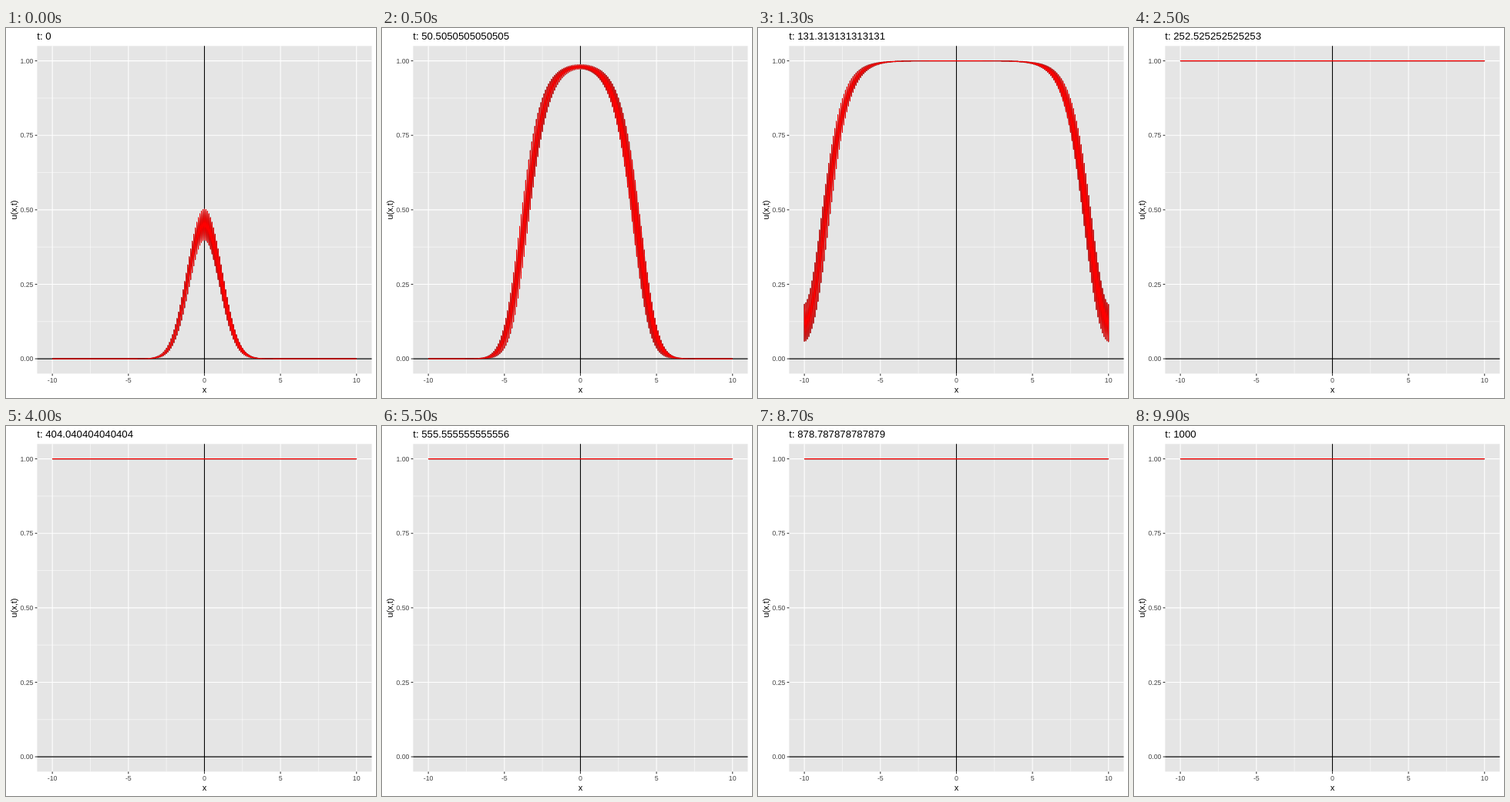
These frames come from a looping animation (480 by 480 pixels, 10 s). An HTML page:

```html
<!DOCTYPE html>
<html lang="en">
<head>
<meta charset="utf-8">
<title>Travelling front</title>
<style>
  html, body { margin: 0; width: 100%; height: 100%; overflow: hidden; background: #fff; }
  svg { display: block; width: 100vw; height: 100vh; font-family: "Liberation Sans", Arial, sans-serif; }
  .tick { font-size: 8.8px; fill: #444; }
  .label { font-size: 11px; text-anchor: middle; }
  .curve { fill: none; stroke-width: 1.07; stroke-linejoin: round; }
</style>
</head>
<body>
<svg id="stage" viewBox="0 0 480 480">
  <rect width="480" height="480" fill="#fff"/>
  <rect x="40.4" y="23.3" width="434.1" height="425.1" fill="#e5e5e5"/>
  <g id="grid"></g>
  <g id="axes"></g>
  <path class="curve" stroke="#000"/>
  <path class="curve" stroke="#f00"/>
  <text class="label" x="257.4" y="473">x</text>
  <text class="label" transform="translate(13.6 236) rotate(-90)">u(x,t)</text>
  <text id="title" x="40.3" y="15" font-size="13.2"></text>
</svg>
<script>
const FRAMES = 100, FRAME_MS = 100, T_END = 1000;
const PANEL = { left: 40.4, right: 474.5, top: 23.3, bottom: 448.4 };
const px = x => 257.45 + x * 19.73;
const py = u => 429.1 - u * 386.5;

const grid = document.getElementById('grid');
const axes = document.getElementById('axes');
const title = document.getElementById('title');
const curves = document.querySelectorAll('.curve');

function add(parent, tag, attrs, text = '') {
  const el = document.createElementNS('http://www.w3.org/2000/svg', tag);
  for (const key in attrs) el.setAttribute(key, attrs[key]);
  el.textContent = text;
  parent.append(el);
}
const line = (parent, x1, y1, x2, y2, stroke, width = 1.07) =>
  add(parent, 'line', { x1, y1, x2, y2, stroke, 'stroke-width': width });
const vertical = (parent, x, color, width) => line(parent, px(x), PANEL.top, px(x), PANEL.bottom, color, width);
const horizontal = (parent, u, color, width) => line(parent, PANEL.left, py(u), PANEL.right, py(u), color, width);

function drawAxes() {
  for (let x = -7.5; x < 10; x += 5) vertical(grid, x, '#fff', 0.53);
  for (let u = 0.125; u < 1; u += 0.25) horizontal(grid, u, '#fff', 0.53);
  for (let x = -10; x <= 10; x += 5) {
    vertical(grid, x, '#fff');
    line(axes, px(x), PANEL.bottom, px(x), PANEL.bottom + 2.75, '#333');
    add(axes, 'text', { class: 'tick', x: px(x), y: 459.8, 'text-anchor': 'middle' }, x);
  }
  for (let u = 0; u <= 1; u += 0.25) {
    horizontal(grid, u, '#fff');
    line(axes, PANEL.left - 2.75, py(u), PANEL.left, py(u), '#333');
    add(axes, 'text', { class: 'tick', x: 35.5, y: py(u) + 3.2, 'text-anchor': 'end' }, u.toFixed(2));
  }
  horizontal(axes, 0, '#000');
  vertical(axes, 0, '#000');
}

// Logistic growth with diffusion, no flux at the ends; one state per unit of time.
function solve(duration) {
  const n = 201, dx = 0.1, dt = 0.02, diffusion = 0.01, growth = 0.1;
  let u = Array.from({ length: n }, (_, k) => {
    const x = (k - 100) * dx;
    return Math.exp(-x * x / 2) / Math.sqrt(2 * Math.PI);
  });
  const states = [u];
  const stepsPerUnit = Math.round(1 / dt);
  for (let t = 1; t <= duration; t++) {
    for (let s = 0; s < stepsPerUnit; s++) {
      const next = new Array(n);
      for (let k = 0; k < n; k++) {
        const left = u[Math.max(k - 1, 0)], right = u[Math.min(k + 1, n - 1)];
        const bend = (left - 2 * u[k] + right) / (dx * dx);
        next[k] = u[k] + dt * (diffusion * bend + growth * u[k] * (1 - u[k]));
      }
      u = next;
    }
    states.push(u);
  }
  return states;
}

const states = solve(350);
const stateAt = t => states[Math.min(Math.max(t, 0), states.length - 1)];

// Every frame joins all states whose time rounds to it, point by point along x.
function curvePath(frame) {
  const step = T_END / (FRAMES - 1);
  const first = stateAt(Math.ceil((frame - 0.5) * step));
  const last = stateAt(Math.floor((frame + 0.5) * step));
  return 'M' + first.map((u, k) => {
    const x = px((k - 100) / 10).toFixed(2);
    return `${x} ${py(u).toFixed(2)}L${x} ${py(last[k]).toFixed(2)}`;
  }).join('L');
}

let shown = -1;
function render(ms) {
  const frame = Math.floor(ms / FRAME_MS) % FRAMES;
  if (frame !== shown) {
    shown = frame;
    const d = curvePath(frame);
    curves.forEach(curve => curve.setAttribute('d', d));
    title.textContent = 't: ' + Number((frame * T_END / (FRAMES - 1)).toPrecision(15));
  }
}

drawAxes();
const start = performance.now();
function tick() {
  render(performance.now() - start);
  requestAnimationFrame(tick);
}
tick();
</script>
</body>
</html>
```
